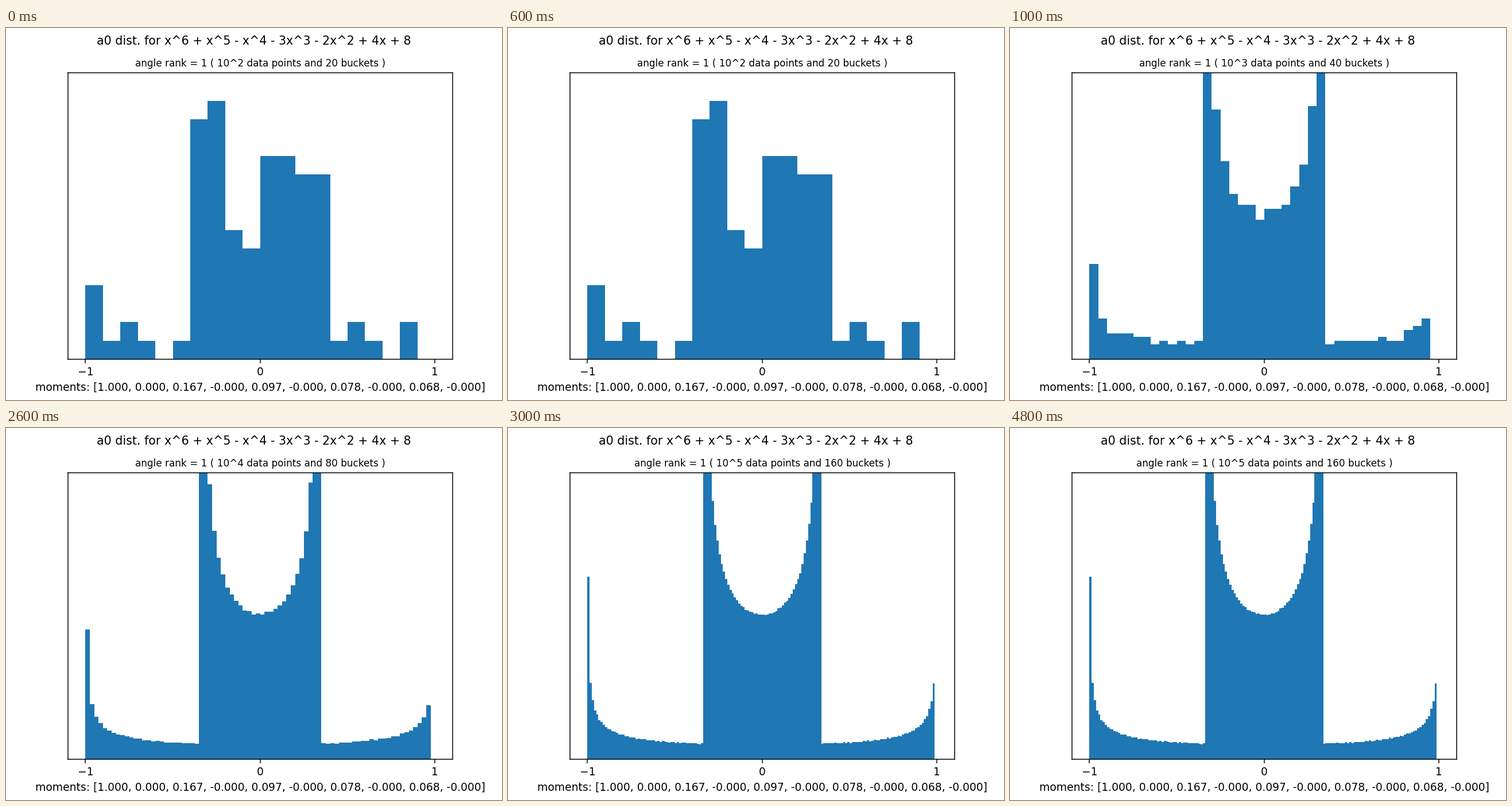
Recreate the animation shown at these times as a matplotlib script. Size 864 by 648 pixels, loop 6000 ms.

```python
import matplotlib.pyplot as plt
import numpy as np
from matplotlib.animation import FuncAnimation

plt.rcParams["font.family"] = "DejaVu Sans"

# Normalised root angles of (t + 1)(t^2 - 7), with t = x + 2/x
ANGLES = np.arccos(np.array([-1, np.sqrt(7), -np.sqrt(7)]) / np.sqrt(8))
MOMENTS = "[1.000, 0.000, 0.167, -0.000, 0.097, -0.000, 0.078, -0.000, 0.068, -0.000]"
STAGES = 4


def a0_values(count):
    """Mean cosine of the root angles for each power 1..count."""
    powers = np.arange(1, count + 1)
    return np.cos(np.outer(powers, ANGLES)).mean(axis=1)


fig, ax = plt.subplots(figsize=(6.4, 4.8), dpi=135)
fig.suptitle("a0 dist. for x^6 + x^5 - x^4 - 3x^3 - 2x^2 + 4x + 8", fontsize=11)


def draw(frame):
    stage = min(frame, STAGES - 1)
    exponent, buckets = stage + 2, 20 * 2**stage
    ax.clear()
    # The edges stop one bucket short of 1
    edges = -1 + np.arange(buckets) * 2 / buckets
    ax.hist(a0_values(10**exponent), bins=edges, density=True, color="#1f77b4")
    ax.set(xlim=(-1.1, 1.1), ylim=(0, 1.6), xticks=[-1, 0, 1], yticks=[])
    ax.set_xlabel(f"moments: {MOMENTS}", fontsize=10)
    ax.set_title(
        f"angle rank = 1 ( 10^{exponent} data points and {buckets} buckets )",
        fontsize=9,
    )


# The last stage is held for three seconds
anim = FuncAnimation(fig, draw, frames=6, interval=1000, repeat=True,
                     init_func=lambda: draw(0))
plt.show()
```
